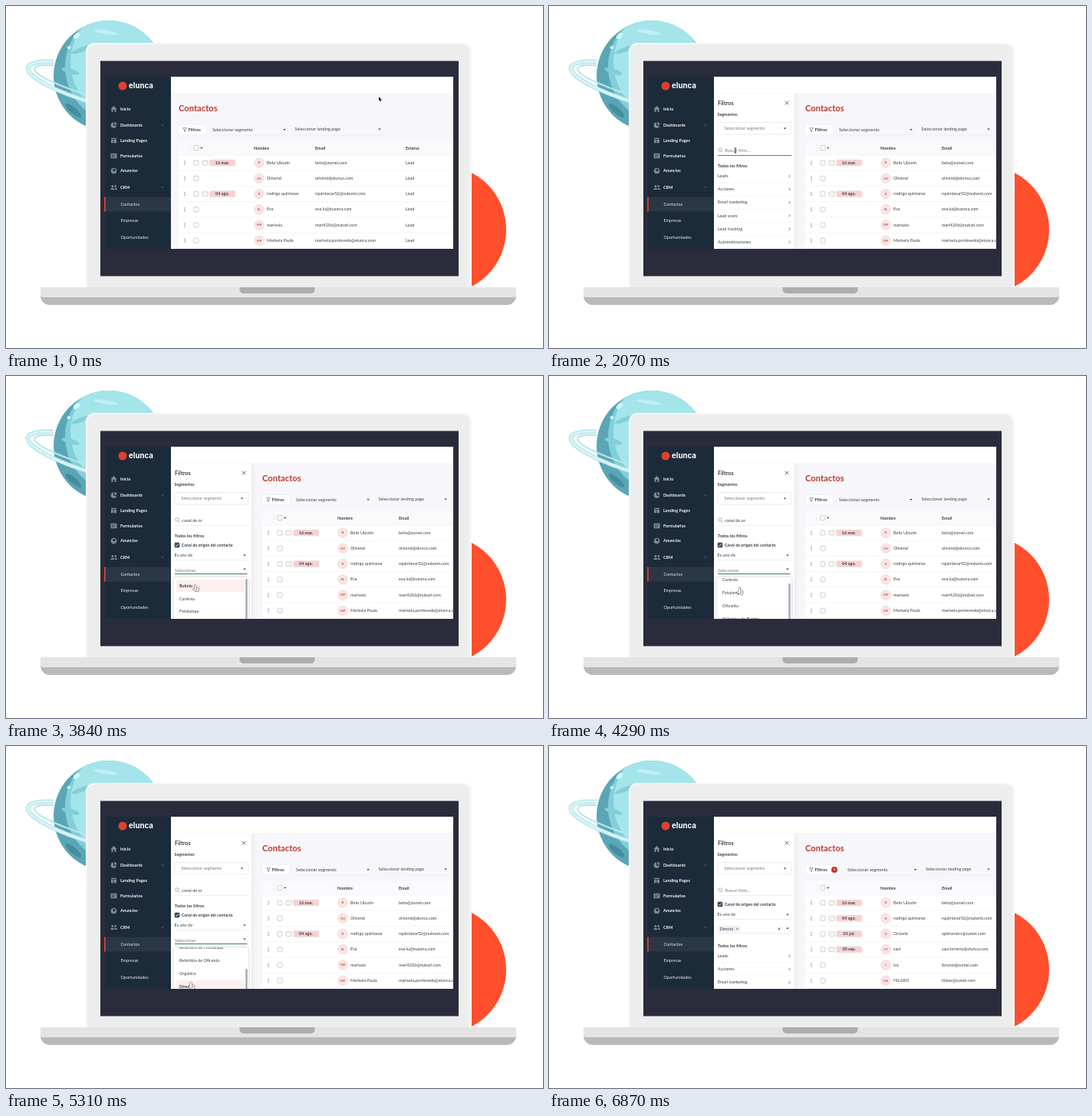
Write an HTML page with a canvas that moves like this. It is 700 by 445 pixels and loops after 6900 ms.

```html
<!DOCTYPE html>
<html lang="es">
<head>
<meta charset="utf-8">
<style>
html, body { margin: 0; width: 100%; height: 100%; overflow: hidden; background: #fff; }
canvas { display: block; width: 700px; height: 445px; }
</style>
</head>
<body>
<canvas></canvas>
<script>
const LOOP = 6900, INK = '#3c3f4a', MUTED = '#777b86', RED = '#c4372c', GREEN = '#3f7a68';
const canvas = document.querySelector('canvas'), c = canvas.getContext('2d');
const dpr = window.devicePixelRatio || 1;
canvas.width = 700 * dpr;
canvas.height = 445 * dpr;

const clamp = v => Math.max(0, Math.min(1, v));
const ease = (t, from, to) => { const p = clamp((t - from) / (to - from)); return p * p * (3 - 2 * p); };

function rect(x, y, w, h, fill, r = 0, stroke) {
  c.beginPath();
  c.roundRect(x, y, w, h, r);
  paint(fill, stroke);
}
function paint(fill, stroke, width = 0.6) {
  if (fill) { c.fillStyle = fill; c.fill(); }
  if (stroke) { c.strokeStyle = stroke; c.lineWidth = width; c.stroke(); }
}
function oval(x, y, rx, ry, fill, angle = 0, stroke, width) {
  c.beginPath();
  c.ellipse(x, y, rx, ry, angle, 0, 7);
  paint(fill, stroke, width);
}
const disc = (x, y, r, fill, stroke) => oval(x, y, r, r, fill, 0, stroke);
function line(color, width, ...points) {
  c.beginPath();
  for (let i = 0; i < points.length; i += 2) c.lineTo(points[i], points[i + 1]);
  paint(null, color, width);
}
function text(s, x, y, size = 5.5, color = INK, weight = 400, align = 'left', family = 'Lato') {
  c.font = `${weight} ${size}px ${family}, sans-serif`;
  c.textAlign = align;
  c.textBaseline = 'middle';
  c.fillStyle = color;
  c.fillText(s, x, y);
}
const bold = (s, x, y, size, color) => text(s, x, y, size, color, 700);
function caret(x, y, color = INK) {
  c.beginPath();
  c.moveTo(x - 1.7, y - 0.9);
  c.lineTo(x + 1.7, y - 0.9);
  c.lineTo(x, y + 1);
  paint(color);
}
function cross(x, y, r, width = 0.7) {
  line(INK, width, x - r, y - r, x + r, y + r);
  line(INK, width, x + r, y - r, x - r, y + r);
}
function clipped(x, y, w, h, draw) {
  c.save();
  c.beginPath();
  c.rect(x, y, w, h);
  c.clip();
  draw();
  c.restore();
}
function checkbox(x, y, checked) {
  rect(x - 3, y - 3, 6, 6, checked ? '#34495c' : '#fff', 1, checked ? '#34495c' : '#a9adb8');
  if (checked) line('#fff', 0.9, x - 1.8, y, x - 0.5, y + 1.4, x + 1.9, y - 1.5);
}

function planet() {
  const tilt = 0.26;
  c.save();
  c.beginPath();
  c.arc(134, 91, 72, 0, 7);
  c.clip();
  c.fillStyle = '#5ba6b6';
  c.fillRect(60, 15, 150, 150);
  disc(151, 79, 74, '#82cfd9');
  disc(158, 73, 74, '#a3e5ea');
  oval(98, 57, 13, 3, '#82cfd9', -0.35);
  oval(84, 85, 12, 3.5, '#82cfd9', 0.3);
  oval(92, 39, 5, 3, '#d2f5f6', -0.7);
  oval(82, 54, 2.5, 2, '#d2f5f6');
  oval(130, 34, 16, 2.5, '#c0eff2', 0.15);
  oval(88, 136, 13, 4, '#438d9e', 0.7);
  c.restore();

  c.save();
  c.beginPath();
  c.rect(0, 0, 62, 200);
  c.moveTo(62, 92);
  c.lineTo(110, 106);
  c.lineTo(110, 150);
  c.lineTo(62, 140);
  c.clip();
  oval(134, 108, 109, 23, null, tilt, '#a3dfe7', 5.5);
  oval(134, 108, 109, 23, null, tilt, '#d9f3f6', 3.5);
  oval(134, 107, 100, 16, null, tilt, '#b6e6ec', 2.2);
  c.restore();
}

function laptop() {
  disc(568.7, 291, 83.3, '#ff4f2d');
  rect(104, 48, 503, 330, '#f6f6f6', [11, 11, 0, 0]);
  rect(106, 50, 498, 325, '#ededed', [9, 9, 0, 0]);
  rect(123, 71.5, 467, 280, '#2a2c3b');
  rect(45, 377, 620, 12, '#b9b9b9', [0, 0, 24, 24]);
  rect(45, 366, 620, 13, '#e4e4e4', [1, 1, 3, 3]);
  rect(304.5, 366, 98, 8, '#adadad', [0, 0, 5, 5]);
}

const icons = [
  'M-4 0L0-4L4 0H3V4H1V1H-1V4H-3V0Z',
  'M-.5-3.5A3.7 3.7 0 1 0 3.5 .8H-.5ZM.8-4V-.5H4A3.7 3.7 0 0 0 .8-4Z',
  'M-3.5-3.2H3.5V-1.7H-3.5ZM-3.5-1H-.8V3.2H-3.5ZM0-1H3.5V3.2H0Z',
  'M-4-3.2H4V3.2H-4ZM-2.5-1.6V-.8H2.5V-1.6ZM-2.5 .6V1.4H1V.6Z',
  'M-3.8 0A3.8 3.8 0 1 0 3.8 0A3.8 3.8 0 1 0-3.8 0ZM-2-1.5L.5 1L2.5-1L1-2.8Z',
  'M-3.2-1.5a1.5 1.5 0 1 0 3 0a1.5 1.5 0 1 0-3 0ZM.8-1.5a1.4 1.4 0 1 0 2.8 0a1.4 1.4 0 1 0-2.8 0ZM-4.5 3Q-4 .7-1.7 .7T1 3ZM1.6 3Q1.5 1.5 1 .9Q4.4 .2 4.7 3Z'
].map(d => new Path2D(d));
const menu = [['Inicio', 134], ['Dashboards', 155], ['Landing Pages', 175], ['Formularios', 195], ['Anuncios', 214.5], ['CRM', 236]];

function sidebar() {
  rect(129, 92, 86, 224, '#1c2b39');
  disc(152, 104, 5.5, '#e0402c');
  text('elunca', 160, 104, 9.7, '#fff', 700, 'left', 'Inter');
  menu.forEach(([label, y], i) => {
    c.save();
    c.translate(140.5, y);
    c.fillStyle = '#7f8993';
    c.fill(icons[i], 'evenodd');
    c.restore();
    bold(label, 149, y, 5.5, '#f2f4f6');
    if (i === 1 || i === 5) line('#7f8993', 0.6, 202.5, y - 0.8, 204, y + 0.7, 205.5, y - 0.8);
  });
  rect(129, 248.5, 86, 19, '#2a3744');
  rect(128, 248.5, 1.8, 19, '#e0402c');
  ['Contactos', 'Empresas', 'Oportunidades'].forEach((s, i) => text(s, 149.5, 258 + i * 21.7, 5.5, '#e4e8ec'));
}

// initials, name, email, date tag
const first = ['B', 'Beto Ulzurin', 'beto@zumel.com', '16 mar.'];
const quintanar = ['R', 'rodrigo quintanar', 'rquintanar52@nubarel.com', '04 ago.'];
const allContacts = [
  first,
  ['OV', 'Olivend', 'olivend@elunca.com'],
  quintanar,
  ['EL', 'Eva', 'eva.lu@buzona.com'],
  ['MP', 'marisela', 'mari4206@nubarl.com'],
  ['MP', 'Marisela Paula', 'marisela.pontevedo@elunca.com']
];
const directContacts = [
  first,
  quintanar,
  ['O', 'Octavio', 'opbrunelcs@zumel.com', '01 jul.'],
  ['ST', 'saul', 'saul.terreno@elunca.com', '30 sep.'],
  ['I', 'Ivy', 'ibrunel@zumel.com'],
  ['HA', 'HILARO', 'hilaro@zumel.com']
];

function contactRow([initials, name, email, date], y) {
  line('#ececf1', 0.6, 225, y + 10.1, 583, y + 10.1);
  for (const d of [-2, 0, 2]) disc(233, y + d, 0.6, INK);
  checkbox(248, y);
  if (date) {
    rect(256, y - 2.7, 7, 5.5, '#fff', 0.8, '#a9adb8');
    line('#c5c8d0', 0.5, 256.5, y - 2, 259.5, y + 0.3, 262.5, y - 2);
    rect(265.5, y - 4.2, 33.5, 8.4, '#f6d3d3', 1.5);
    text(date, 282, y, 5.5, INK, 700, 'center');
  }
  disc(330, y, 6.4, '#fae4e3', '#f3d3d2');
  text(initials, 330, y, 4.2, '#b85a54', 700, 'center');
  text(name, 340, y);
  text(email, 403, y);
  text('Lead', 521, y);
}

function contacts(t, dx) {
  const applied = t >= 6330, extra = applied ? 11 : 0;
  rect(215, 92, 368, 224, '#f7f7fb');
  rect(215, 92, 368, 22, '#fff');
  line('#ededf2', 0.6, 215, 114, 583, 114);
  c.save();
  c.translate(dx, 0);
  bold('Contactos', 225, 133.5, 11.2, RED);
  const pressed = t >= 780 && t < 1480;
  rect(225, 154.5, 36 + extra, 13, pressed ? '#cfe1e6' : '#fff', 2, pressed ? '#9fbcc5' : '#ececf1');
  c.beginPath();
  for (const [x, y] of [[230.5, 158.7], [235.5, 158.7], [233.6, 161], [233.6, 163.6], [232.4, 163], [232.4, 161]]) c.lineTo(x, y);
  c.closePath();
  paint(null, INK, 0.5);
  bold('Filtros', 237.5, 161, 5.8);
  if (applied) {
    disc(263, 161, 4, RED);
    text('1', 263, 161, 4.5, '#fff', 700, 'center');
  }
  text('Seleccionar segmento', 269 + extra, 161);
  caret(363 + extra / 2, 161);
  line('#e3e4ea', 0.5, 267 + extra, 168, 367 + extra / 2, 168);
  text('Seleccionar landing page', 376.5 + extra / 2, 160.5);
  caret(Math.min(487, 573 - dx), 160.5);
  line('#e3e4ea', 0.5, 375 + extra / 2, 168, Math.min(491, 577 - dx), 168);

  rect(225, 176, 358, 140, '#fff');
  rect(225, 176, 358, 18, '#fafafc');
  line('#ececf1', 0.6, 225, 194, 583, 194);
  line('#e3e4ea', 0.5, 240, 178, 240, 191);
  checkbox(248, 184.5);
  caret(254.8, 184.7);
  bold('Nombre', 323, 185);
  bold('Email', 403, 185);
  bold('Estatus', 521, 185);
  (t >= 6560 ? directContacts : allContacts).forEach((row, i) => contactRow(row, 204 + i * 20.25));
  c.restore();
}

const filters = ['Leads', 'Acciones', 'Email marketing', 'Lead score', 'Lead tracking', 'Automatizaciones'];
function filterList(y) {
  bold('Todos los filtros', 220, y);
  filters.forEach((s, i) => {
    const rowY = y + 13.3 + i * 17.2;
    text(s, 220, rowY);
    line(INK, 0.7, 312.6, rowY - 1.6, 314.2, rowY, 312.6, rowY + 1.6);
    line('#efeff3', 0.5, 220, rowY + 8.5, 316, rowY + 8.5);
  });
}

function condition(y, checked, chip, choosing) {
  checkbox(223, y, checked);
  text('Canal de origen del contacto', 228.7, y, 5.3, INK, 700);
  if (!checked) return;
  text('Es uno de', 219.5, y + 13.5);
  caret(311, y + 13.5);
  line('#d9dbe2', 0.5, 220, y + 19.5, 315, y + 19.5);
  const fieldY = y + 32;
  if (chip) {
    rect(220.5, fieldY - 4, 29, 8, '#f0f0f3', 1.5);
    text('Directo', 222.5, fieldY);
    cross(245.5, fieldY, 1.2, 0.6);
    cross(300, fieldY, 1.5);
  } else {
    text('Seleccionar', 220, fieldY + 1.5, 5.5, MUTED);
  }
  caret(311, fieldY - 0.5);
  line('#d9dbe2', 0.5, 220, y + 37.5, 315, y + 37.5);
  if (choosing > 0) line(GREEN, 1, 220, y + 37.5, 220 + 94.5 * choosing, y + 37.5);
}

const channels = ['Bulmio', 'Cartevia', 'Fotolampa', 'Oficantu', 'Referidos de Bulmio', 'Referidos de Cartevia',
  'Referidos de Fotolampa', 'Referidos de Oficantu', 'Orgánico', 'Directo'];
function dropdown(t) {
  const scroll = 112 * ease(t, 4140, 4640);
  const hover = t < 3740 ? -1 : t < 4140 ? 0 : t > 5080 ? 9 : -1;
  c.save();
  c.shadowColor = 'rgba(40,42,60,.25)';
  c.shadowBlur = 4 * dpr;
  rect(219, 262, 97, 70, '#fff', 1);
  c.restore();
  clipped(219, 262, 97, 54, () => {
    channels.forEach((s, i) => {
      const y = 273 + i * 16.9 - scroll;
      if (i === hover) rect(222.5, y - 8, 87.5, 16, '#fcefee', 1);
      text(s, 226, y, 5.5, INK, i === hover ? 700 : 400);
    });
    rect(312.3, 264 + 26 * scroll / 112, 2.4, 60, '#a4a7ae', 1);
  });
}

function panel(t, dx) {
  c.save();
  c.translate(dx - 109, 0);
  c.shadowColor = 'rgba(40,42,60,.12)';
  c.shadowBlur = 7 * dpr;
  rect(210, 114, 110, 220, '#fff');
  c.shadowColor = 'transparent';
  bold('Filtros', 220, 126.5, 7.4);
  cross(310, 126, 2.4);
  bold('Segmentos', 219.5, 141.5, 5.3);
  rect(220, 151.5, 96, 15.5, '#fff', 2, '#dfe0e7');
  text('Seleccionar segmento', 228.5, 159.5, 5.5, MUTED);
  caret(307.5, 159.5);

  const applied = t >= 6330, query = 'canal de or';
  const typed = applied ? '' : query.slice(0, Math.floor(clamp((t - 2080) / 560) * query.length));
  disc(223, 187, 2.2, null, MUTED);
  line(MUTED, 0.7, 224.6, 188.7, 226.3, 190.5);
  text(typed || 'Buscar filtro...', 229.3, 188, 5.5, typed ? INK : MUTED);
  line('#dfe0e7', 0.5, 220, 194.5, 316, 194.5);
  const focus = ease(t, 1900, 2040) * (1 - ease(t, 2830, 2960));
  if (focus > 0) line(GREEN, 0.9, 220, 194.5, 220 + 96 * focus, 194.5);

  if (applied) {
    condition(206, true, true, 0);
    filterList(260);
  } else if (typed.length > 1) {
    bold('Todos los filtros', 220, 208);
    condition(220, t >= 3020, t >= 5400, ease(t, 3440, 3580) * (1 - ease(t, 6180, 6310)));
    if (t >= 3520 && t < 5430) dropdown(t);
  } else {
    filterList(208);
  }
  c.restore();
}

const arrow = new Path2D('M0 0V5.6L1.3 4.5L2.2 6.5L3.1 6.1L2.3 4.2H4Z');
const hand = new Path2D('M-1 1.1A1 1 0 0 1 1 1.1V3.8L3.8 4.4Q5 4.7 4.8 6L4.2 9H0L-2.7 6Q-2.6 4.7-1 5.4Z');
const beam = new Path2D('M-1.3-3H1.3M0-3V3M-1.3 3H1.3');
// time, x, y
const stops = [[60, 486, 118], [680, 246, 161], [1080, 246, 161], [1190, 246, 165.5], [1500, 246, 165.5], [1850, 243, 188],
  [2600, 243, 188], [2860, 224, 220], [3080, 224, 220], [3380, 262, 252], [3580, 262, 252], [3800, 246.5, 271.5],
  [4110, 246.5, 271.5], [4500, 250.5, 279], [4830, 250.5, 279], [5150, 241, 307], [5550, 241, 307], [5850, 250, 330]];

function cursor(t) {
  let [, x, y] = stops[0];
  for (let i = 1; i < stops.length; i++) {
    const [t0, x0, y0] = stops[i - 1], [t1, x1, y1] = stops[i];
    if (t < t0) break;
    const p = ease(t, t0, t1);
    x = x0 + (x1 - x0) * p;
    y = y0 + (y1 - y0) * p;
  }
  c.save();
  c.translate(x, y);
  c.lineJoin = 'round';
  const typing = t > 1790 && t < 2680;
  const shape = t < 620 ? arrow : typing ? beam : hand;
  c.lineWidth = 0.9;
  c.strokeStyle = shape === arrow ? '#fff' : '#222';
  c.stroke(shape);
  c.fillStyle = shape === arrow ? '#111' : '#fff';
  if (!typing) c.fill(shape);
  if (shape === hand) line('#555', 0.5, 1.2, 5.5, 1.2, 7.5, 1.2, 5.5, 2.8, 5.8, 2.7, 7.5);
  c.restore();
}

function frame(now) {
  const t = now % LOOP;
  const dx = 109 * ease(t, 810, 1080);
  c.setTransform(dpr, 0, 0, dpr, 0, 0);
  c.fillStyle = '#fff';
  c.fillRect(0, 0, 700, 445);
  planet();
  laptop();
  clipped(128, 92, 455, 224, () => {
    contacts(t, dx);
    if (dx > 0) clipped(215, 114, 368, 202, () => panel(t, dx));
    sidebar();
    cursor(t);
  });
  requestAnimationFrame(frame);
}
requestAnimationFrame(frame);
</script>
</body>
</html>
```
